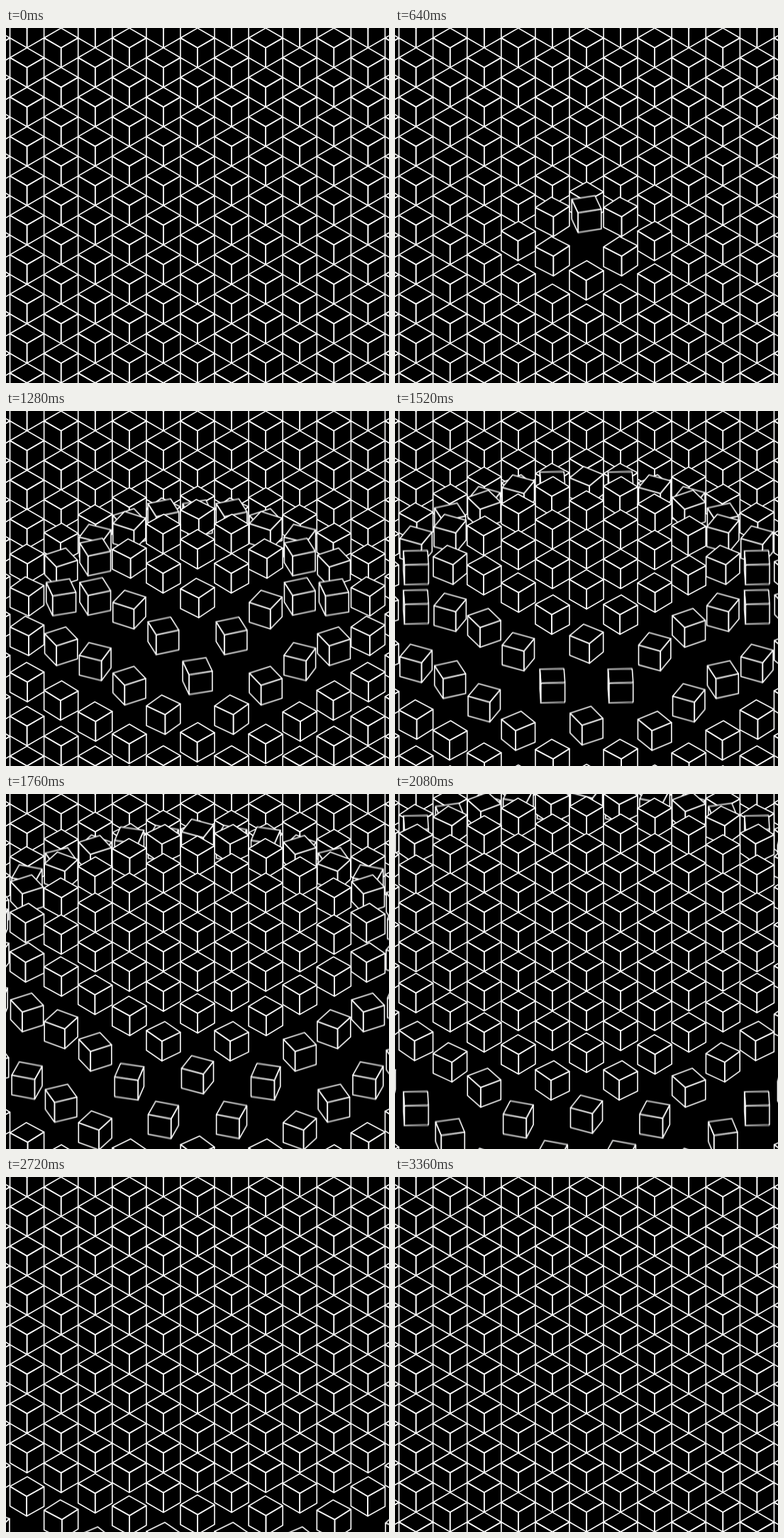
Recreate the animation shown at these times as an HTML page with a canvas. Size 540 by 500 pixels, loop 3600 ms.

```html
<!DOCTYPE html>
<html lang="en">
<head>
<meta charset="utf-8">
<title>Cube ripple</title>
<style>
  html, body { margin: 0; width: 100%; height: 100%; overflow: hidden; background: #000; }
  canvas { display: block; }
</style>
</head>
<body>
<canvas id="stage" width="540" height="500"></canvas>
<script>
const WIDTH = 540, HEIGHT = 500;
const LOOP = 3600, STEP = 20;
const RISE_TIME = 1400, WAVE_SPEED = 0.3;
const SHUTTER = 12, SAMPLES = 5;

// Isometric view of cubes standing two edge lengths apart
const EDGE = 34, LINE = 1.6;
const FLOOR = Math.sqrt(1 / 3), UP = Math.sqrt(2 / 3);
const RADIUS = EDGE * Math.SQRT1_2;
const COLUMN = 2 * RADIUS, ROW = COLUMN * FLOOR;
const TALL = EDGE * UP, LIFT = 4 * TALL;
const CENTER_X = WIDTH / 2, CENTER_Y = HEIGHT / 2 + 2 * TALL;

const stage = document.getElementById('stage').getContext('2d');
const layer = document.createElement('canvas');
layer.width = WIDTH;
layer.height = HEIGHT;
const ctx = layer.getContext('2d');
ctx.lineWidth = LINE;
ctx.lineJoin = 'round';
ctx.strokeStyle = '#fff';
ctx.fillStyle = '#000';

// Back to front
const cubes = [];
for (let row = -13; row <= 13; row++) {
  for (let col = -6; col <= 6; col++) {
    if ((row + col) % 2) continue;
    cubes.push({
      x: CENTER_X + col * COLUMN,
      y: CENTER_Y + row * ROW,
      delay: Math.hypot(col, row) * COLUMN / WAVE_SPEED,
      spin: col % 2 ? -1 : 1
    });
  }
}

function easeInOut(p, power) {
  p = Math.min(1, Math.max(0, p));
  return p < 0.5 ? (2 * p) ** power / 2 : 1 - (2 - 2 * p) ** power / 2;
}

function facePath(points) {
  const path = new Path2D();
  for (const [x, y] of points) path.lineTo(x, y);
  path.closePath();
  return path;
}

function drawCube(cube, time) {
  const p = (time - cube.delay) / RISE_TIME;
  const y = cube.y - easeInOut(p, 3) * LIFT - TALL / 2;
  const angle = cube.spin * easeInOut(p, 5) * Math.PI / 2;
  const top = [0, 1, 2, 3].map(k => {
    const a = angle + k * Math.PI / 2;
    return [cube.x + RADIUS * Math.cos(a), y + RADIUS * Math.sin(a) * FLOOR];
  });
  const below = ([px, py]) => [px, py + TALL];

  const faces = [facePath(top)];
  top.forEach((from, k) => {
    const to = top[(k + 1) % 4];
    const facesViewer = to[0] < from[0] - 1e-6;
    if (facesViewer) faces.push(facePath([from, to, below(to), below(from)]));
  });
  for (const face of faces) ctx.fill(face);
  for (const face of faces) ctx.stroke(face);
}

function drawScene(time) {
  ctx.fillRect(0, 0, WIDTH, HEIGHT);
  for (const cube of cubes) drawCube(cube, time);
}

// Averages a few moments of the open shutter into one picture
function render(time) {
  for (let i = 0; i < SAMPLES; i++) {
    drawScene(time + SHUTTER * i / SAMPLES);
    stage.globalAlpha = 1 / (i + 1);
    stage.drawImage(layer, 0, 0);
  }
}

const start = performance.now();
let shown = -1;
function tick() {
  const elapsed = (performance.now() - start) % LOOP;
  const time = Math.floor(elapsed / STEP) * STEP;
  if (time !== shown) render(shown = time);
  requestAnimationFrame(tick);
}
tick();
</script>
</body>
</html>
```
